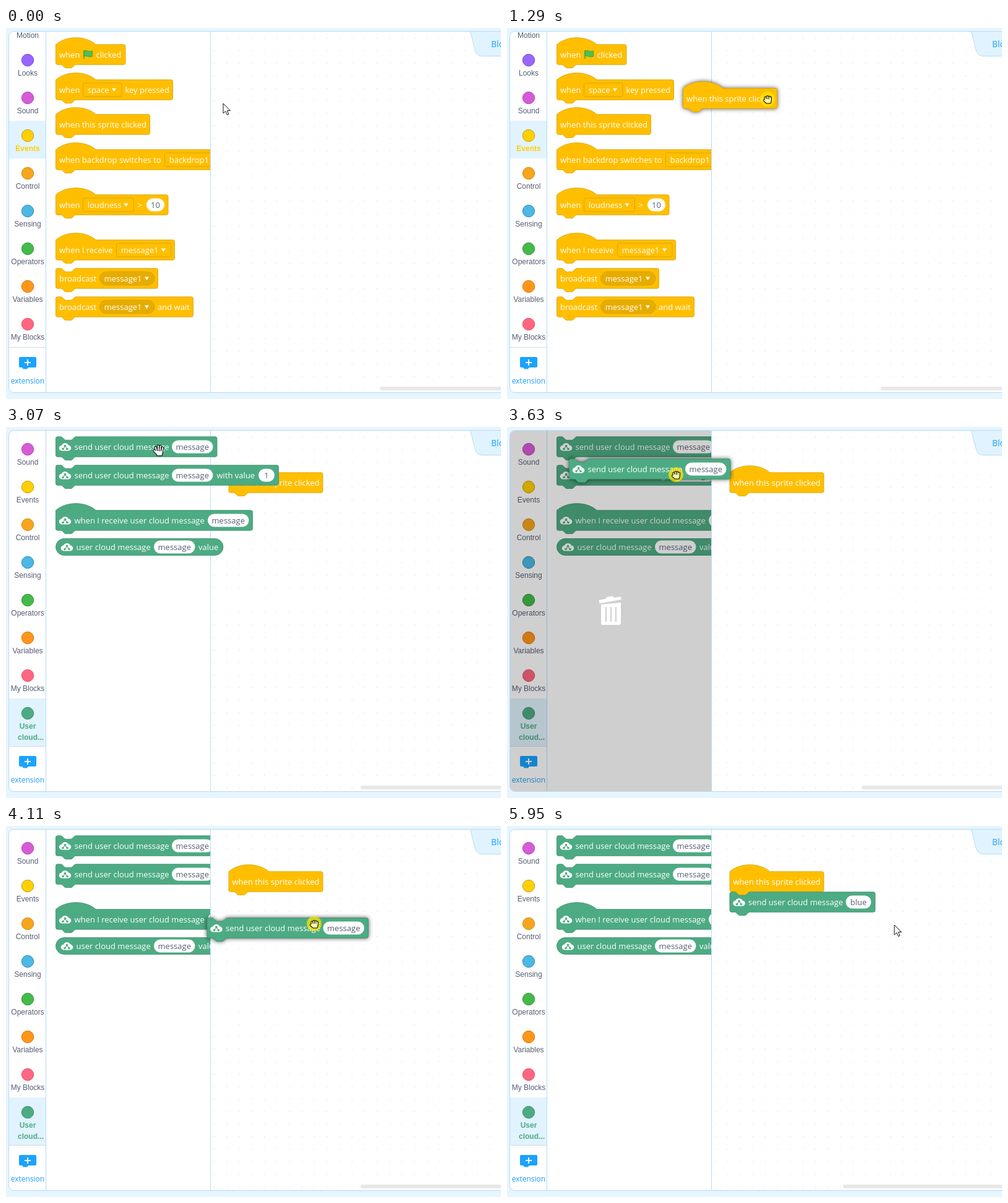
These frames come from a looping animation (800 by 600 pixels, 6320 ms). An HTML page:

```html
<!DOCTYPE html>
<html lang="en">
<head>
<meta charset="utf-8">
<title>Block editor</title>
<style>
  html, body { margin: 0; width: 100%; height: 100%; overflow: hidden; background: #e7f5fe; }
  svg { display: block; width: 800px; height: 600px; }
  text { font: 13px "Open Sans", sans-serif; fill: #fff; white-space: pre; }
  .mid { text-anchor: middle; }
  .side text { font: 12px "Liberation Sans", Arial, sans-serif; fill: #575e75; text-anchor: middle; }
  .side .on { font-weight: bold; }
  .lift { filter: drop-shadow(0 0 3.5px rgba(0, 0, 0, .65)); }
</style>
</head>
<body>
<svg viewBox="0 0 800 600" width="800" height="600">
  <defs>
    <pattern id="dots" x="326.4" y="6.4" width="20.25" height="20.25" patternUnits="userSpaceOnUse">
      <circle cx="10.1" cy="10.1" r=".75" fill="#d9d9d9"/>
    </pattern>
    <clipPath id="panel"><rect x="5" y="6" width="820" height="583" rx="8"/></clipPath>
    <clipPath id="list"><rect x="5" y="6" width="60" height="510"/></clipPath>
    <clipPath id="fly"><rect id="flyBox" x="65" y="6" width="265" height="583"/></clipPath>
  </defs>

  <rect x="4.5" y="5.5" width="820" height="584" rx="8" fill="#fff" stroke="#b5dcf8"/>
  <rect x="331" y="6" width="469" height="583" fill="url(#dots)"/>
  <path d="M749.5 5.5C752 9 753 17 756 28C759 41 761 45.500 771 45.500H810V5.500Z" fill="#e1f3fe" stroke="#b5dcf8"/>
  <text x="784" y="31" style="font-size:14px;fill:#1ea4f8">Blocks</text>
  <rect id="bar" y="580" width="400" height="6" rx="3" fill="#e8e8e8"/>
  <g id="work"></g>

  <path d="M64.500 6V589M330.500 6V589" stroke="#b5dcf8"/>
  <g clip-path="url(#panel)">
    <g class="side" clip-path="url(#list)" id="cats"></g>
    <path d="M5 516.500H64" stroke="#d5dde4"/>
    <path d="M23 532H47Q49 532 49 534V547Q49 549 47 549H36L34 551.500H28L26 549H23Q21 549 21 547V534Q21 532 23 532Z" fill="#1aa3ff"/>
    <path d="M30 541H40M35 536V546" stroke="#fff" stroke-width="2"/>
    <text class="mid" x="35" y="575" style="font-size:12px;fill:#1e9cf5">extension</text>
  </g>
  <g id="palette" clip-path="url(#fly)"></g>

  <g id="bin" clip-path="url(#panel)">
    <path d="M5 6H330V589H5Z" opacity=".19"/>
    <g fill="#fff">
      <path d="M148.500 280L159 278L161 275L171 273.500L173 276L184 274.500L185 279L149.500 285.500Z"/>
      <path d="M152 287L184 284V317Q184 320 181 320H155Q152 320 152 317Z"/>
    </g>
    <path d="M160 291V315M168 291V315M176 291V315" stroke="#d0d0d0" stroke-width="2"/>
  </g>
  <g id="top"></g>
  <g id="cursor"></g>
</svg>

<script>
const $ = id => document.getElementById(id);
const LOOP = 6320, SCALE = .675, LEFT = 80.5;
const YELLOW = { fill: '#ffbf00', edge: '#d9a300', dark: '#e6ac00' };
const GREEN = { fill: '#4dab83', edge: '#3f906d', dark: '#3f906d' };

// Block parts; x is measured from the block's left edge, y from its middle.
const label = (x, s) => `<text x="${x}" y="5">${s}</text>`;
const arrow = x => `<path d="M${x} -2.500h7l-3.500 5.500z" fill="#fff"/>`;
const pill = (x, w, s) =>
  `<rect x="${x}" y="-10.500" width="${w}" height="21" rx="10.500" fill="#fff"/>
   <text class="mid" x="${x + w / 2}" y="5" style="fill:#575e75">${s}</text>`;
const menu = (x, w, s, round) =>
  `<rect x="${x}" y="-11" width="${w}" height="22" rx="${round ? 11 : 2.5}"
     fill="${round ? YELLOW.dark : 'none'}" stroke="${YELLOW.edge}" stroke-width=".9"/>` +
  label(x + 7.2, s) + arrow(x + w - 16);
const cloud = x =>
  `<g transform="translate(${x})"><path fill="#fff" d="M-5 6.500A4.500 4.500 0 0 1 -5.500 -2.500A6 6 0 0 1 5.500 -2.500A4.500 4.500 0 0 1 5 6.500Z"/>
   <path d="M-3 3L0 -1L3 3" fill="none" stroke="${GREEN.fill}" stroke-width="1.200"/>
   <g fill="${GREEN.fill}"><circle cy="-1.500" r="1.800"/><circle cx="-3.500" cy="3.500" r="1.800"/><circle cx="3.500" cy="3.500" r="1.800"/></g></g>`;
const flag =
  `<path d="M45.500 -6C49 -8.500 53 -3.500 59 -6V3C53 5.500 49 0.500 45.500 3Z" fill="#4cbf56" stroke="#45993d" stroke-width=".8"/>
   <path d="M45.500 -7V7" stroke="#45993d" stroke-width="1.300"/>`;

function outline(kind, w) {
  const W = w / SCALE;
  const head = kind === 'hat'
    ? 'M0 0c25-22 71-22 96 0'
    : 'M0 4A4 4 0 0 1 4 0H12c2 0 3 1 4 2l4 4c1 1 2 2 4 2h12c2 0 3-1 4-2l4-4c1-1 2-2 4-2';
  return head + `H${W - 4}a4 4 0 0 1 4 4v40a4 4 0 0 1-4 4H48c-2 0-3 1-4 2l-4 4c-1 1-2 2-4 2` +
    'h-12c-2 0-3-1-4-2l-4-4c-1-1-2-2-4-2H4a4 4 0 0 1-4-4z';
}

function block(kind, tone, w, parts) {
  const paint = `fill="${tone.fill}" stroke="${tone.edge}"`;
  const body = kind === 'round'
    ? `<rect y="-13.500" width="${w}" height="27" rx="13.500" ${paint} stroke-width=".9"/>`
    : `<path d="${outline(kind, w)}" transform="translate(0 -16.200) scale(${SCALE})" ${paint} stroke-width="1.300"/>`;
  return body + parts;
}
const place = (y, svg) => `<g transform="translate(${LEFT} ${y})">${svg}</g>`;

const clickedHat = block('hat', YELLOW, 152, label(5.5, 'when this sprite clicked'));
const sendBlock = (field, w, extra = '') =>
  block('stack', GREEN, 187.5 + w + 6.5, cloud(15) + label(30, 'send user cloud message') + pill(187.5, w, field) + extra);

const eventBlocks = [
  place(43, block('hat', YELLOW, 112.5, label(5.5, 'when') + flag + label(65, 'clicked'))),
  place(100, block('hat', YELLOW, 189, label(5.5, 'when') + menu(44, 62.5, 'space') + label(112, 'key pressed'))),
  place(156, clickedHat),
  place(213, block('hat', YELLOW, 276, label(5.5, 'when backdrop switches to') + menu(176, 94, 'backdrop1'))),
  place(286, block('hat', YELLOW, 181.5, label(5.5, 'when') + menu(44, 82, 'loudness') + label(132, '&gt;') + pill(146.5, 29, '10'))),
  place(359, block('hat', YELLOW, 192, label(5.5, 'when I receive') + menu(98, 88.5, 'message1'))),
  place(405, block('stack', YELLOW, 165, label(5.5, 'broadcast') + menu(71, 88.5, 'message1', true))),
  place(451, block('stack', YELLOW, 222, label(5.5, 'broadcast') + menu(71, 88.5, 'message1', true) + label(164.5, 'and wait')))
].join('');

const cloudBlocks = [
  place(32, sendBlock('message', 66.5)),
  place(78, block('stack', GREEN, 360, cloud(15) + label(30, 'send user cloud message') +
    pill(187.5, 66.5, 'message') + label(260, 'with value') + pill(327.5, 26, '1'))),
  place(151, block('hat', GREEN, 318, cloud(15) + label(30, 'when I receive user cloud message') + pill(245.5, 66.5, 'message'))),
  place(194, block('round', GREEN, 270.5, cloud(18) + label(33, 'user cloud message') +
    pill(158.5, 66.5, 'message') + label(230.5, 'value')))
].join('');

const categories = [
  ['Motion', '#4c97ff', '#3373cc'], ['Looks', '#9966ff', '#774dcb'], ['Sound', '#d65cd6', '#bd42bd'],
  ['Events', '#ffd000', '#cc9900'], ['Control', '#f7a51c', '#cf8b17'], ['Sensing', '#4cb8e3', '#2e8eb8'],
  ['Operators', '#43ba4a', '#389438'], ['Variables', '#ff961a', '#db6e00'], ['My Blocks', '#ff6680', '#e64d68'],
  ['User|cloud...', '#4dab83', '#3f906d']
];
function sidebar(active, shift) {
  return categories.map(([name, fill, edge], i) => {
    const y = -9 + 61 * i - shift, on = i === active, lines = name.split('|');
    return (on ? `<rect x="5" y="${y - 24}" width="59" height="${lines.length > 1 ? 78 : 61}" fill="#e1f3fe"/>` : '') +
      `<circle cx="35" cy="${y}" r="9.700" fill="${fill}" stroke="${edge}"/>` +
      lines.map((s, k) => `<text x="${35 + 5 * k}" y="${y + 25 + 18 * k}" ${on ? `class="on" style="fill:${fill}"` : ''}>${s}</text>`).join('');
  }).join('');
}

// Pointers
const hand = (d, fill) => `<g stroke-linecap="round" stroke-linejoin="round">
  <path d="${d}" fill="#000" stroke="#000" stroke-width="4"/><path d="${d}" fill="${fill}" stroke="${fill}" stroke-width="1.900"/></g>`;
const halo = '<circle r="12" fill="#ffe600" opacity=".72"/>';
const beam = '<path d="M-3 -8Q0 -8 0 -6V6Q0 8 -3 8M3 -8Q0 -8 0 -6M0 6Q0 8 3 8" fill="none" stroke="#222"/>';
const pointers = {
  arrow: '<path d="M0 0V16L3.800 12.500L6.500 18.500L9 17.400L6.400 11.600H11.500Z" fill="#fff" stroke="#111" stroke-linejoin="round"/>',
  open: hand('M-4 1L-5 -5M-1 0V-7.500M2 0L2.500 -7M5 1L6 -4.500M-7.500 0L-4 4M-4 2H5L4 7H-2Z', '#fff'),
  grab: halo + hand('M-3.500 1V-2.500M-.5 0V-4M2.500 0V-3.500M5 1V-2.500M-5 2L-3 4M-3.500 1H5L4 5.500H-1.500Z', '#fff6a8'),
  beam, click: halo + beam
};

const bursts = [
  [250, 820, 7], [910, 1470, 7], [1570, 1660, 2], [1850, 2230, 5], [2420, 2510, 3], [2680, 3250, 7],
  [3430, 4000, 7], [4110, 4110, 1], [4320, 4930, 8], [5030, 5030, 1], [5220, 5400, 3], [5580, 5950, 5]
];
function lastChange(t) {
  let r = 0;
  for (const [a, b, n] of bursts) {
    if (t < a) break;
    const step = (b - a) / (n - 1) || 1;
    r = Math.min(b, a + Math.floor((t - a + 12) / step) * step);
  }
  return r;
}

const pointerPath = [
  [155, 351, 122], [630, 199, 160], [820, 217, 157], [1283, 421, 115], [1470, 465, 105], [1570, 497, 91],
  [1850, 497, 91], [2040, 487, 91], [2230, 487, 91], [2510, 452, 85], [2585, 452, 85], [3060, 247, 38],
  [3250, 253, 41], [3335, 253, 41], [3620, 273, 77], [4000, 476, 152], [4110, 498, 158], [4407, 535, 121],
  [4494, 535, 121], [4930, 589, 130], [5485, 589, 130], [5950, 626, 160]
];
const hatPath = [[820, LEFT, 156], [1283, 284.5, 114], [1470, 328, 104], [1570, 360, 90]];
const sendPath = [[3335, LEFT, 32], [3620, 100.5, 68], [4000, 303, 159], [4110, 325, 165], [4407, 363, 127], [4494, 360, 123]];

function along(path, t) {
  const i = path.findIndex(k => k[0] > t);
  if (i === 0) return path[0].slice(1);
  if (i < 0) return path[path.length - 1].slice(1);
  const [a, b] = [path[i - 1], path[i]], u = (t - a[0]) / (b[0] - a[0]);
  return [a[1] + (b[1] - a[1]) * u, a[2] + (b[2] - a[2]) * u];
}

const cache = new Map();
function fill(el, svg) {
  if (cache.get(el) !== svg) { cache.set(el, svg); el.innerHTML = svg; }
}
const move = (el, [x, y]) => el.setAttribute('transform', `translate(${x.toFixed(2)} ${y.toFixed(2)})`);
const show = (el, on) => { el.style.display = on ? '' : 'none'; };

const newGroup = () => $('work').appendChild(document.createElementNS('http://www.w3.org/2000/svg', 'g'));
const hatEl = newGroup(), sendEl = newGroup();
const sides = [sidebar(3, 0), sidebar(9, 77)];

function pose(el, path, t, start, end) {
  const held = t >= start && t < end, parent = held ? $('top') : $('work');
  show(el, t >= start);
  if (el.parentNode !== parent) parent.append(el);
  el.setAttribute('class', held ? 'lift' : '');
  move(el, along(path, t));
  return held;
}

function sendLook(t) {
  if (t < 5215) return sendBlock('message', 66.5);
  if (t < 5305) return sendBlock('message', 66.5,
    '<rect x="194" y="-8" width="54" height="16" fill="#3297fd"/><text class="mid" x="220.750" y="5">message</text>');
  const caret = x => `<path d="M${x} -7V7" stroke="#575e75"/>`;
  if (t < 5395) return sendBlock('bl', 30, caret(209.5));
  return sendBlock('blue', 41, t < 5575 ? caret(223) : '');
}

function pointerKind(t, held) {
  if (held) return 'grab';
  if (t < 620 || t >= 5575) return 'arrow';
  if (t < 4740) return 'open';
  return t >= 5030 && t < 5215 ? 'click' : 'beam';
}

function draw(now) {
  const t = lastChange(now % LOOP), at = along(pointerPath, t), inCloud = t >= 2415;
  fill($('cats'), sides[+inCloud]);
  fill($('palette'), inCloud ? cloudBlocks : eventBlocks);
  fill(hatEl, clickedHat);
  fill(sendEl, sendLook(t));
  const hatHeld = pose(hatEl, hatPath, t, 905, 1655);
  const sendHeld = pose(sendEl, sendPath, t, 3425, 4490);
  const held = hatHeld || sendHeld, inside = at[0] < 331;
  show($('bin'), held && inside);
  $('flyBox').setAttribute('width', inside && !held ? 735 : 265);
  $('bar').setAttribute('x', t < 1845 ? 604 : t < 4575 ? 573 : 543);
  fill($('cursor'), pointers[pointerKind(t, held)]);
  move($('cursor'), at);
}

function tick() {
  draw(performance.now());
  requestAnimationFrame(tick);
}
tick();
</script>
</body>
</html>
```
